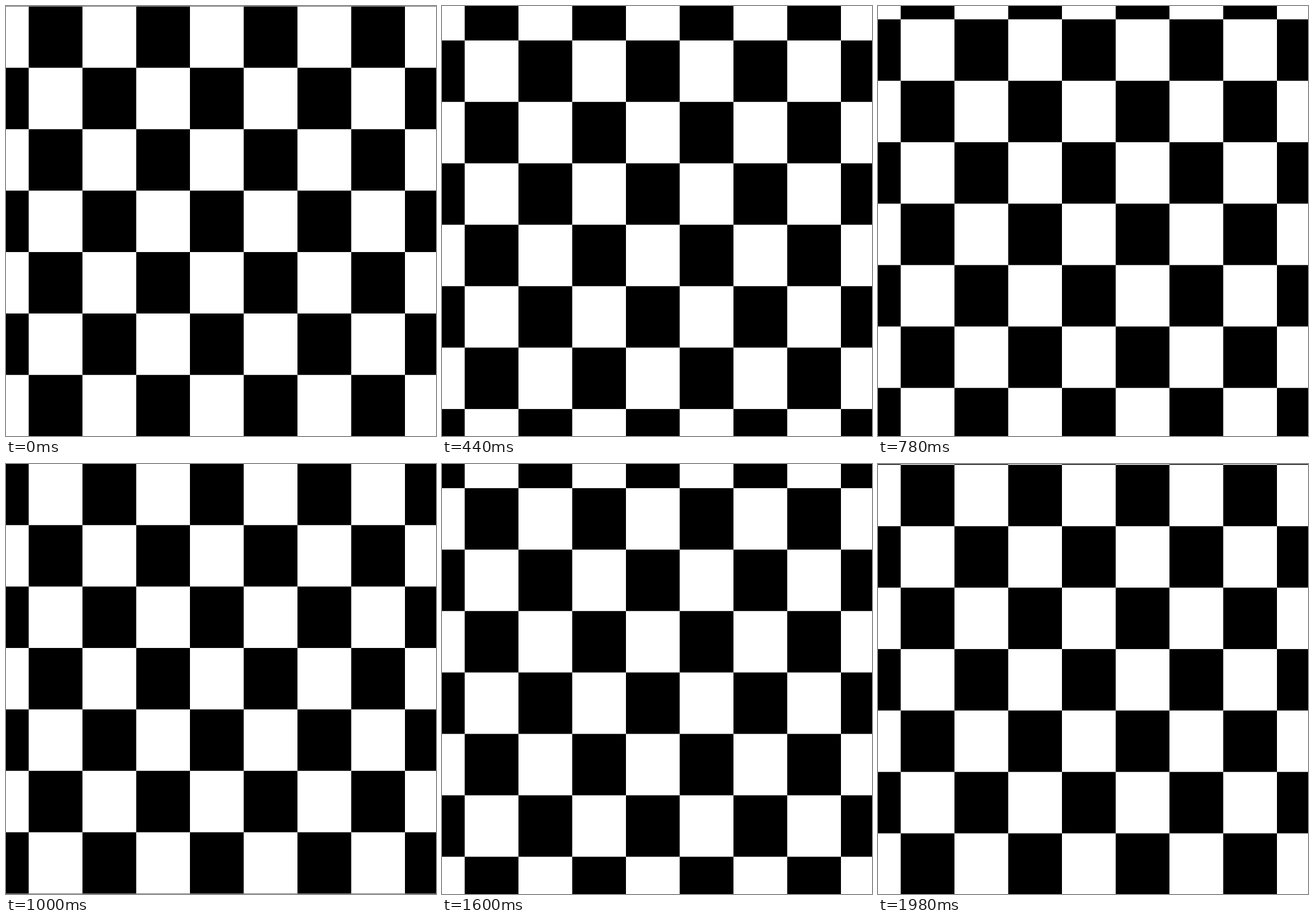
These frames come from a looping animation (748 px wide and 748 px high, 2000 ms). An HTML page with a canvas:

```html
<!DOCTYPE html>
<html lang="en">
<head>
<meta charset="utf-8">
<title>Scrolling checkerboard</title>
<style>
html, body { margin: 0; width: 100%; height: 100%; overflow: hidden; background: #fff; }
canvas { display: block; width: 748px; height: 748px; }
</style>
</head>
<body>
<canvas id="stage" width="748" height="748"></canvas>
<script>
(() => {
  const SIZE = 748, LOOP = 2000, STEP = 20;
  const W = SIZE / 8, H = SIZE / 7, LEFT = 39.5;
  const ctx = document.getElementById('stage').getContext('2d');

  // The board scrolls up two rows per loop, slightly faster in the first half.
  function boardY(t) {
    return t < 1000
      ? 0.6 - 0.108 * t
      : -107.4 - 0.1071 * (t - 1000);
  }

  function draw(t) {
    const y = boardY(t);
    ctx.fillStyle = '#fff';
    ctx.fillRect(0, 0, SIZE, SIZE);
    ctx.fillStyle = '#000';
    for (let row = -1; row < 10; row++) {
      for (let col = -1; col < 8; col++) {
        if ((row + col) % 2 === 0) ctx.fillRect(LEFT + col * W, y + row * H, W, H);
      }
    }
  }

  const start = performance.now();
  function tick() {
    const t = (performance.now() - start) % LOOP;
    draw(Math.floor(t / STEP) * STEP);
    requestAnimationFrame(tick);
  }
  tick();
})();
</script>
</body>
</html>
```
